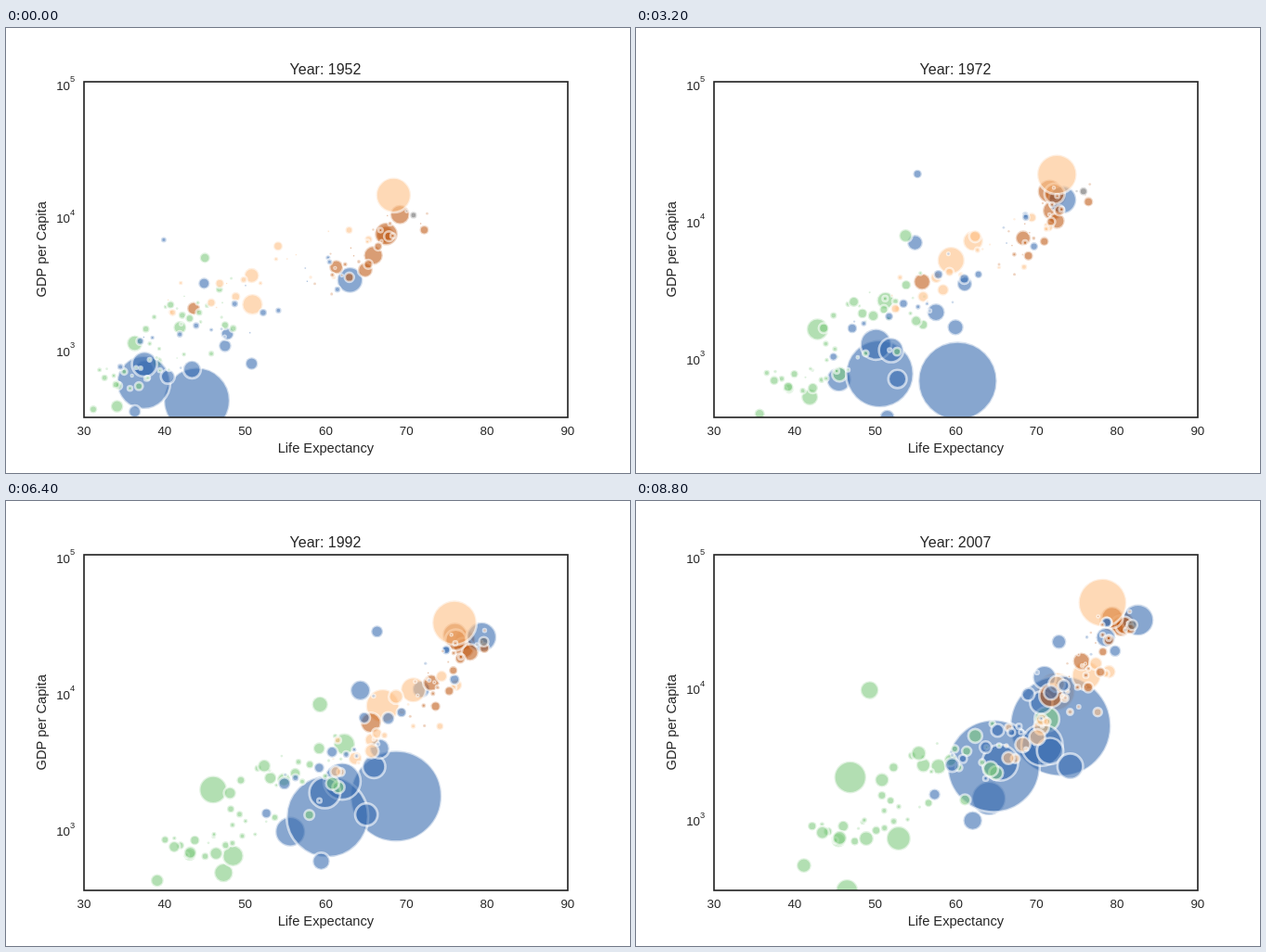
These frames come from a looping animation (672x480 px, 9.6 s). An HTML page:

```html
<!DOCTYPE html>
<html lang="en">
<head>
<meta charset="utf-8">
<title>Life expectancy and GDP</title>
<style>
  html, body { margin: 0; width: 100%; height: 100%; overflow: hidden; background: #fff; }
  svg { display: block; }
  text { font: 13.33px "Liberation Sans", Arial, sans-serif; fill: #262626; text-anchor: middle; }
  .label { font-size: 14.67px; }
  .title { font-size: 16px; }
  .exp { font-size: 9.33px; }
  .left { text-anchor: start; }
  .right { text-anchor: end; }
  circle { fill-opacity: .6; stroke: #fff; stroke-opacity: .6; stroke-width: 2.667; }
</style>
</head>
<body>
<svg width="672" height="480" viewBox="0 0 672 480">
  <clipPath id="plot"><rect x="84" y="58" width="521" height="362"/></clipPath>
  <g id="bubbles" clip-path="url(#plot)"></g>
  <rect x="84" y="58" width="521" height="362" fill="none" stroke="#262626" stroke-width="1.67"/>
  <g id="ticks"></g>
  <text id="title" class="title" x="344" y="50"></text>
  <text class="label" x="344.4" y="458">Life Expectancy</text>
  <text class="label" transform="translate(43 238.8) rotate(-90)">GDP per Capita</text>
</svg>
<script>
const LEFT = 84, WIDTH = 520.8, TOP = 57.6, HEIGHT = 362.4, STEP = 800, LAST = 11;
const AFRICA = '#7fc97f', AMERICAS = '#fdc086', ASIA = '#386cb0', EUROPE = '#bf5b17', OCEANIA = '#666666';
// Lowest income of each step: the vertical axis starts there.
const LOW = [299, 336, 355, 349, 357, 371, 424, 385, 347, 312, 241, 278];
const $ = id => document.getElementById(id);
const bubbles = [];

function make(parent, tag, attrs, text = '') {
  const el = document.createElementNS('http://www.w3.org/2000/svg', tag);
  for (const k in attrs) el.setAttribute(k, attrs[k]);
  el.textContent = text;
  return parent.appendChild(el);
}

const mix = (a, b, f) => a + (b - a) * f;

// Value at time t (0 to 1) on a line through evenly spaced points
function at(points, t) {
  const n = points.length - 1, i = Math.min(Math.floor(t * n), n - 1);
  return mix(points[i], points[i + 1], t * n - i);
}

// First and last population in millions, then pairs of life expectancy and income
function add(fill, first, last, ...pairs) {
  bubbles.push({
    el: make($('bubbles'), 'circle', { fill }),
    radius: [first, last].map(p => Math.sqrt(p * 5) * 2 / 3),
    life: pairs.filter((_, i) => i % 2 === 0),
    income: pairs.filter((_, i) => i % 2).map(Math.log10)
  });
}

// The most populous countries, each with a few points of its path
add(ASIA, 47, 150, 37.5, 684, 48.5, 670, 64.1, 1391);
add(AMERICAS, 57, 190, 50.9, 2109, 62.6, 6850, 72.4, 9066);
add(ASIA, 570, 1319, 44, 400, 45.5, 500, 63.5, 700, 66.3, 1080, 70.1, 2200, 73, 4959);
add(AFRICA, 14, 65, 39.1, 781, 48, 720, 46.5, 278);
add(AFRICA, 22, 80, 41.9, 1419, 54.8, 3150, 71.3, 5581);
add(AFRICA, 21, 77, 34.1, 362, 44.8, 568, 52.9, 691);
add(EUROPE, 43, 61, 67.4, 7030, 74.4, 19300, 80.7, 30470);
add(EUROPE, 69, 82, 67.5, 7144, 73.2, 21300, 79.4, 32170);
add(ASIA, 372, 1110, 37.4, 547, 49.7, 718, 59.2, 1030, 64.7, 2452);
add(ASIA, 82, 224, 37.5, 750, 54.8, 1460, 70.7, 3541);
add(ASIA, 17, 70, 44.9, 3035, 58.7, 9000, 71, 11606);
add(EUROPE, 48, 58, 65.9, 4931, 74.3, 15700, 80.5, 28570);
add(ASIA, 87, 128, 63, 3217, 72.7, 13000, 78.6, 23500, 82.6, 31656);
add(ASIA, 21, 49, 47.5, 1031, 66.2, 5200, 78.6, 23348);
add(AMERICAS, 30, 109, 50.8, 3478, 66.4, 8900, 76.2, 11978);
add(ASIA, 20, 48, 36.3, 331, 57.2, 370, 62.1, 944);
add(AFRICA, 33, 135, 36.3, 1077, 45.3, 1800, 46.9, 2014);
add(ASIA, 41, 169, 43.4, 685, 55.2, 1320, 65.5, 2606);
add(ASIA, 22, 91, 47.8, 1273, 61.2, 2500, 71.7, 3190);
add(EUROPE, 26, 39, 61.3, 4029, 71, 9000, 75.6, 15390);
add(ASIA, 4, 28, 39.9, 6460, 61, 33000, 72.8, 21655);
add(AFRICA, 14, 44, 45, 4725, 53, 7500, 61.5, 7700, 49.3, 9270);
add(EUROPE, 29, 40, 64.9, 3834, 75.4, 13600, 80.9, 28821);
add(ASIA, 21, 65, 50.8, 758, 63.4, 2150, 70.6, 7458);
add(EUROPE, 22, 71, 43.6, 1969, 60.4, 4300, 71.8, 8458);
add(EUROPE, 50, 61, 69.2, 9980, 73.4, 17800, 79.4, 33203);
add(AMERICAS, 158, 301, 68.4, 13990, 74.1, 24500, 78.2, 42952);
add(ASIA, 26, 85, 40.4, 605, 57.4, 710, 74.2, 2442);

// The smaller countries: seeded places within a band of each continent.
// A band runs from its poorest corner to its richest: life, income, life, income.
let seed = 7;
const random = () => (seed = seed * 16807 % 2147483647) / 2147483647;

function scatter(fill, count, maxPop, growth, spread, from, to) {
  for (let i = 0; i < count; i++) {
    const rank = (i + random()) / count, pop = .3 + maxPop * random() ** 2;
    const wide = random() - .5, high = 10 ** (spread * (random() - .5));
    const place = ([life, income, topLife, topIncome]) =>
      [mix(life, topLife, rank) + wide * 4, income * (topIncome / income) ** rank * high];
    const [life, income] = place(from), [endLife, endIncome] = place(to);
    // Progress is quicker in the first half.
    add(fill, pop, pop * growth, life, income,
      mix(life, endLife, .62), income * (endIncome / income) ** .6, endLife, endIncome);
  }
}
scatter(AFRICA, 46, 9, 3.6, .5, [32, 480, 48, 2200], [42, 600, 65, 3500]);
scatter(AMERICAS, 21, 12, 3, .35, [39, 2000, 66, 6500], [66, 3000, 79, 13000]);
scatter(ASIA, 20, 9, 3.5, .4, [33, 600, 63, 4500], [56, 1200, 81, 33000]);
scatter(EUROPE, 23, 13, 1.15, .2, [58, 2800, 72, 10500], [73, 7500, 81, 38000]);
scatter(OCEANIA, 2, 8, 2.2, .1, [69, 10000, 70, 10500], [80, 25000, 81, 34000]);

const title = $('title'), ticks = $('ticks');
for (let i = 0; i < 7; i++)
  make(ticks, 'text', { x: LEFT + WIDTH * i / 6, y: 438.5 }, 30 + i * 10);
const decades = [5, 4, 3].map(power => {
  const el = make(ticks, 'g', {});
  make(el, 'text', { class: 'right', x: 69, y: 9 }, '10');
  make(el, 'text', { class: 'exp left', x: 69, y: .5 }, power);
  return { el, power };
});

function draw(step) {
  const t = step / LAST, scale = HEIGHT / (5 - Math.log10(LOW[step]));
  const y = power => TOP + (5 - power) * scale;
  for (const b of bubbles) {
    b.el.setAttribute('cx', LEFT + (at(b.life, t) - 30) / 60 * WIDTH);
    b.el.setAttribute('cy', y(at(b.income, t)));
    b.el.setAttribute('r', at(b.radius, t));
  }
  for (const d of decades) d.el.setAttribute('transform', `translate(0 ${y(d.power)})`);
  title.textContent = `Year: ${1952 + step * 5}`;
}

let shown = -1;
function tick() {
  const step = Math.floor(performance.now() / STEP) % (LAST + 1);
  if (step !== shown) draw(shown = step);
  requestAnimationFrame(tick);
}
tick();
</script>
</body>
</html>
```
